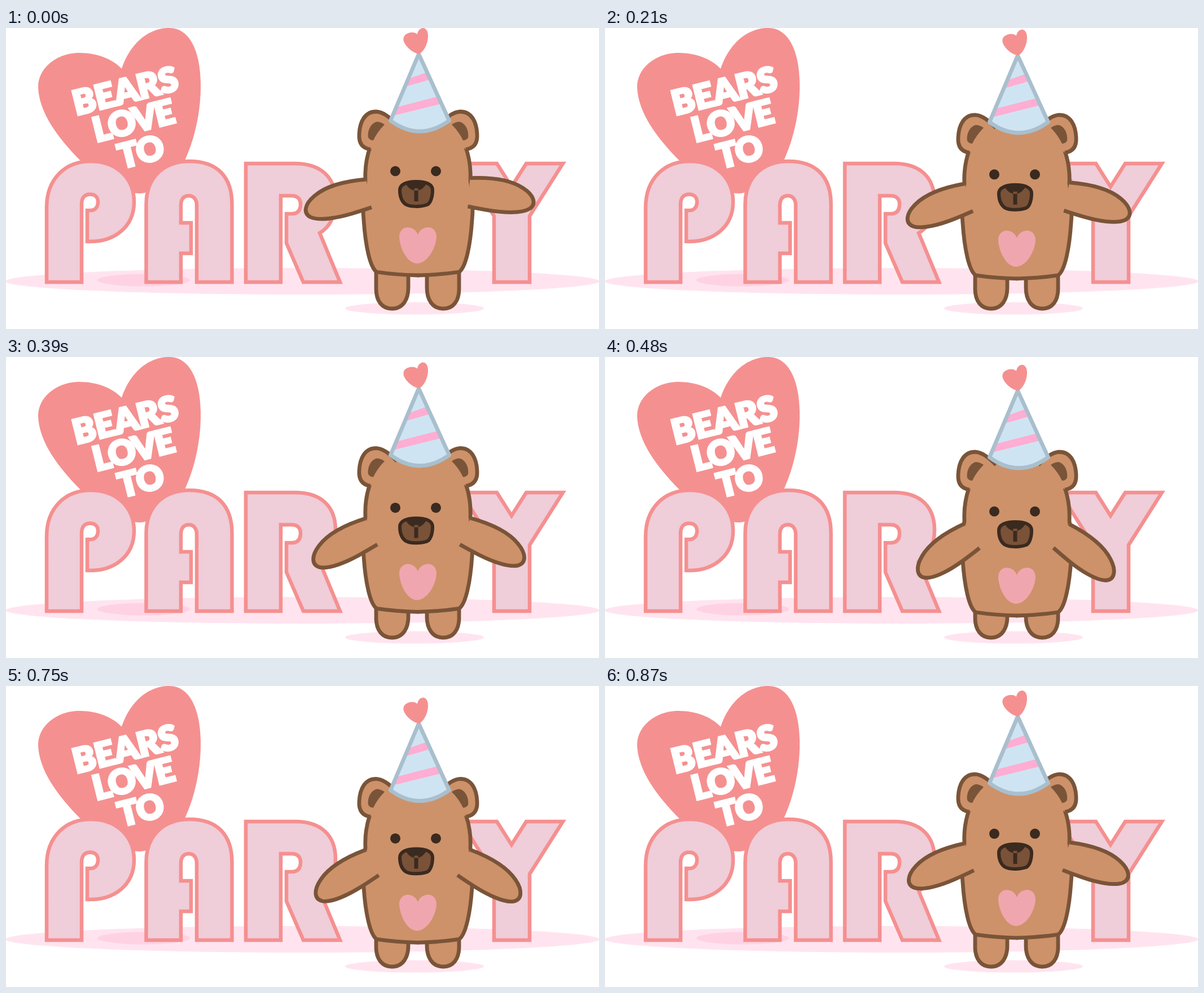
These frames come from a looping animation (1051x533 px, 0.9 s). An HTML page:

```html
<!DOCTYPE html>
<html lang="en">
<head>
<meta charset="utf-8">
<title>Bears love to party</title>
<style>
html, body { margin: 0; width: 100%; height: 100%; overflow: hidden; background: #fff; }
svg { display: block; width: 100vw; height: 100vh; }
.letters path { fill: #efcdd9; stroke: #f59090; stroke-width: 6.5; stroke-miterlimit: 8; }
.slogan text {
  font: 900 60px Lato, "Open Sans", sans-serif; text-anchor: middle;
  fill: #fff; stroke: #fff; stroke-width: 4;
}
.tight { letter-spacing: -2.5px; }
.fur { fill: #cd926a; }
.both { fill: #cd926a; stroke: #7a5438; stroke-width: 6.8; }
.dark { fill: #3b2a1f; }
.red { fill: #f59090; }
</style>
</head>
<body>
<svg viewBox="0 0 1051 533">
  <defs>
    <path id="leg" class="both" d="M656 428V462C656 484 667 497 684 497C704 497 713 480 713 460V434"/>
    <path id="side" class="both" d="M645 212C638 232 636 250 637 270C632 300 632 320 634 340C637 385 645 424 657 432Q690 437 731 438"/>
    <g id="ear">
      <path class="both" d="M646 215C632 213 625 204 626 188C627 166 636 148 656 148C668 149 678 156 693 171"/>
      <path fill="#7a5438" d="M642 194C640 180 648 168 657 166Q664 166 671 171Q658 184 651 199Q645 199 642 194Z"/>
    </g>
    <path id="arm" class="both" d="M638 268C602 271 567 280 547 297C529 312 526 328 540 335C556 342 588 336 612 329Q632 323 648 317.500"/>
  </defs>

  <ellipse cx="525.5" cy="448.5" rx="526" ry="23.5" fill="#ffe4ef"/>
  <ellipse cx="244" cy="446.5" rx="82" ry="11" fill="#ffd2e3"/>
  <ellipse cx="724" cy="496.5" rx="123" ry="11" fill="#ffe4ef"/>

  <path class="red" d="M205 72C188 54 158 43 126 44C88 46 56 72 57 106C59 150 92 195 133 236C165 266 200 292 238 293C270 290 300 262 318 232C337 190 346 140 345 96C344 40 325 0 290 0C258-1 222 22 205 72Z"/>
  <g class="slogan">
    <text transform="translate(216.500 132) rotate(-14)">BEARS</text>
    <text class="tight" transform="translate(230 185) rotate(-14)">LOVE</text>
    <text class="tight" transform="translate(243 240) rotate(-14)">TO</text>
  </g>

  <g class="letters">
    <path d="M72 450V318C72 266 106 236 150 236C196 236 227 266 227 308C227 352 192 380 144 378V323H150C158 323 163 317 163 308C163 299 157 294.500 149 294.500C140 294.500 134 300 134 312V450Z"/>
    <path d="M248.500 450V312C248.500 264 280 236 325 236C374 236 400.500 263 400.500 312V450H338V314C338 303 332 297 324 297C315 297 310 303 310 314V345H328V399H310V450Z"/>
    <path d="M425 450V240H512C560 240 584 266 584 306C584 335 572 354 556 363L592 450H527L497 381V329H506C517 329 522 323 522 312C522 302 516 297 506 297H487V450Z"/>
    <path d="M806 240H870L896 281L922 240H987L928 333V450H865V333Z"/>
  </g>

  <use href="#leg"/>
  <use href="#leg" transform="translate(1459 0) scale(-1 1)"/>

  <g id="body">
    <path class="fur" d="M684 164H776L815 212V400L740 436H720L645 400V212Z"/>
    <use href="#side"/>
    <use href="#side" transform="translate(1460 0) scale(-1 1)"/>
    <use href="#ear"/>
    <use href="#ear" transform="translate(1461 0) scale(-1 1)"/>
    <circle class="dark" cx="690" cy="253.500" r="9"/>
    <circle class="dark" cx="762" cy="253.500" r="9"/>
    <path d="M698 287C698 277 710 272 727 272C745 272 756 277 756 287C756 300 752 311 746 313C735 317 716 317 708 312C700 306 698 296 698 287Z" fill="#7a5238" stroke="#3b2a1f" stroke-width="6"/>
    <path class="dark" d="M708 274C712 284 720 288 727 288C735 288 741 283 746 274ZM723.500 284H730.500V307H723.500Z"/>
    <path fill="#f0a6ae" d="M730 366C726 356 718 353 711 353C702 354 697 361 697 370C698 390 711 417 729 417C747 416 762 390 763 370C763 360 757 353 748 353C740 353 733 358 730 366Z"/>
    <use id="left" href="#arm"/>
    <g transform="translate(1461 0) scale(-1 1)"><use id="right" href="#arm"/></g>
  </g>

  <g id="hat">
    <path fill="#cfe4f2" d="M731.500 44L681.500 164Q733 202 785.500 164Z"/>
    <path fill="#ffadd2" d="M708 104L713 90L747 78L753 91ZM687 155L693 140L767 121L772 134Z"/>
    <path fill="none" stroke="#a9bfcd" stroke-width="7" stroke-linejoin="round" d="M731.500 46L681.500 164Q733 202 785.500 164Z"/>
    <path class="red" d="M729 11C724 7 717 7 711 10C704 13 703 20 706 26C711 36 722 44 732 46C741 42 748 27 748 14C748 5 744 0 739 0C733 1 730 5 729 11Z"/>
  </g>
</svg>
<script>
const LOOP = 900, STEP = 30;
const TURN = 540;      // the body starts to rise again
const HAT_TURN = 750;  // the hat follows later
const REST = -7;       // the right arm is held a little higher

const [body, hat, left, right] = ["body", "hat", "left", "right"].map(id => document.getElementById(id));

function bodyDrop(t) {
  const down = t / TURN, up = (t - TURN) / (LOOP - TURN);
  return t < TURN ? 14.5 * down + 11.8 * down ** 4.3 : 18.6 - 14.3 * up ** 3.5;
}

function hatDrop(t) {
  const down = Math.sin(Math.PI / 2 * t / HAT_TURN), up = (t - HAT_TURN) / (LOOP - HAT_TURN);
  return 20.5 * (t < HAT_TURN ? down ** 2.4 : 1 - up ** 2.2);
}

function place(part, y) {
  part.setAttribute("transform", `translate(0 ${y})`);
}

function turn(arm, angle) {
  arm.setAttribute("transform", `rotate(${-angle} 658 272)`);
}

function draw(now) {
  const t = Math.floor((now % LOOP) / STEP) * STEP;
  const drop = bodyDrop(t);
  place(body, drop);
  place(hat, hatDrop(t));
  turn(left, drop * (0.84 + 0.007 * drop));
  turn(right, REST + drop * (1 + 0.024 * drop));
}

let start;
function tick(now) {
  start ??= now;
  draw(now - start);
  requestAnimationFrame(tick);
}
draw(0);
requestAnimationFrame(tick);
</script>
</body>
</html>
```
